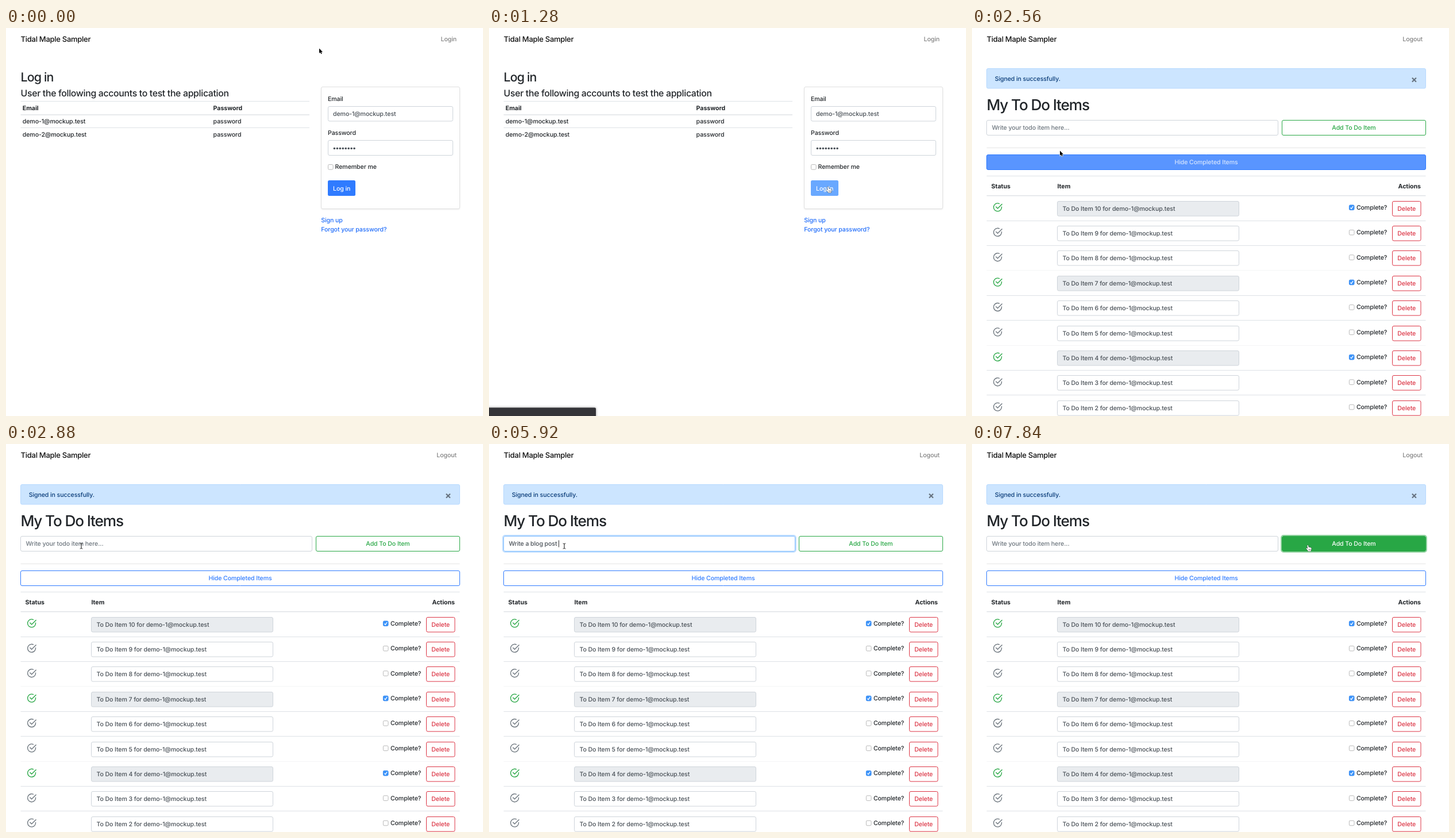
An HTML page with a canvas that plays this animation: 830 by 675 pixels, repeating every 8000 ms.

```html
<!DOCTYPE html>
<html lang="en">
<head>
<meta charset="utf-8">
<title>To do list</title>
<style>
  html, body { margin: 0; width: 100%; height: 100%; overflow: hidden; background: #fff; }
  canvas { display: block; }
</style>
</head>
<body>
<canvas id="stage" width="830" height="675"></canvas>
<script>
const ctx = document.getElementById('stage').getContext('2d');
const LOOP = 8000, TICK = 160;

const BLUE = '#2f7bff', LINK = '#1f6cfa', GREEN = '#28a745', RED = '#dc3545';
const INK = '#212529', FIELD_INK = '#495057', MUTED = '#6c757d';
const BORDER = '#ced4da', LINE = '#dee2e6';

const STYLES = {
  body:  { weight: 450, size: 10.6, track: -0.1 },
  bold:  { weight: 700, size: 10.6, track: -0.03 },
  brand: { weight: 450, size: 13, track: -0.28 },
  h1:    { weight: 550, size: 26.2, track: -1.15 },
  h2:    { weight: 550, size: 21.4, track: -0.9 },
  h4:    { weight: 550, size: 15.8, track: -0.31 },
  close: { weight: 700, size: 16.6, track: 0 }
};

const LOGIN_BTN = [560, 265, 48, 27];
const EMAIL = [560.5, 136.5, 217, 25.5];
const PASSWORD = [560.5, 195.5, 217, 26];
const TODO = [25.5, 160.5, 507, 26];
const ADD_BTN = [539.5, 160.5, 250, 26];
const HIDE_BTN = [25.5, 220.5, 764, 26];

const account = n => `demo-${n}@mockup.test`;

const NOTE = 'Write a blog post about this';
const TYPED = [
  [3520, 1], [3840, 2], [4000, 4], [4160, 5], [4320, 6], [4640, 7], [4800, 8],
  [4960, 9], [5120, 10], [5280, 11], [5600, 12], [5760, 15], [5920, 18],
  [6080, 19], [6240, 21], [6400, 23], [6560, 25], [6720, 27], [6880, 28], [7840, 0]
];

// start, end, from, to
const GLIDES = [
  [0, 640, [545, 35.5], [590, 276.5]],
  [2080, 2560, [590, 276.5], [153, 213.5]],
  [2560, 2880, [153, 213.5], [131, 177.5]],
  [7040, 7520, [131, 177.5], [584.5, 176.5]]
];

function setFont(style) {
  const s = STYLES[style];
  ctx.font = `${s.weight} ${s.size}px Inter, Roboto, sans-serif`;
  ctx.letterSpacing = s.track + 'px';
  ctx.textRendering = 'geometricPrecision';
  return s;
}

// y is the middle of the capitals
function text(str, x, y, color = INK, style = 'body', align = 'left') {
  const s = setFont(style);
  ctx.textAlign = align;
  ctx.fillStyle = color;
  ctx.fillText(str, x, y + s.size * 0.364);
}

function box([x, y, w, h], fill, stroke, r = 2.5) {
  ctx.beginPath();
  ctx.roundRect(x, y, w, h, r);
  if (fill) { ctx.fillStyle = fill; ctx.fill(); }
  if (stroke) { ctx.strokeStyle = stroke; ctx.lineWidth = 1; ctx.stroke(); }
}

function ring([x, y, w, h], color) {
  ctx.beginPath();
  ctx.roundRect(x - 1.4, y - 1.4, w + 2.8, h + 2.8, 4);
  ctx.strokeStyle = color;
  ctx.lineWidth = 2;
  ctx.stroke();
}

function rule(x0, x1, y, color = LINE, h = 1) {
  ctx.fillStyle = color;
  ctx.fillRect(x0, y, x1 - x0, h);
}

function strokeLine(points, color, width) {
  ctx.beginPath();
  points.forEach(p => ctx.lineTo(...p));
  ctx.strokeStyle = color;
  ctx.lineWidth = width;
  ctx.stroke();
}

function mix(hex, amount) {
  const channel = i => parseInt(hex.slice(i, i + 2), 16);
  return `rgb(${[1, 3, 5].map(i => Math.round(255 + (channel(i) - 255) * amount))})`;
}

// Outlined button, filled by the given amount
function button(rect, label, color, amount = 0) {
  const [x, y, w, h] = rect;
  box(rect, mix(color, amount), color);
  text(label, x + w / 2, y + h / 2, mix(color, 1 - amount), 'body', 'center');
}

function checkbox(x, y, on) {
  box([x, y, 8.6, 8.6], on ? '#3b94fb' : '#fff', on ? '#3b8cf0' : '#b9b9b9', 1.8);
  if (on) strokeLine([[x + 2, y + 4.5], [x + 3.7, y + 6.4], [x + 6.7, y + 2]], '#fff', 1.3);
}

function statusIcon(x, y, color) {
  ctx.save();
  ctx.lineCap = ctx.lineJoin = 'round';
  ctx.beginPath();
  ctx.arc(x, y, 7, -0.09, -1.15);
  ctx.strokeStyle = color;
  ctx.lineWidth = 1.35;
  ctx.stroke();
  strokeLine([[x + 7.6, y - 5.5], [x, y + 2], [x - 2.8, y - 0.8]], color, 1.35);
  ctx.restore();
}

function header(link) {
  text('Tidal Maple Sampler', 25.6, 18.8, '#111', 'brand');
  text(link, 784, 18.8, '#808080', 'body', 'right');
}

function loginPage(t) {
  header('Login');
  text('Log in', 25.6, 85, INK, 'h2');
  text('User the following accounts to test the application', 25.6, 113, INK, 'h4');

  rule(25.5, 528, 127);
  rule(25.5, 528, 150.3, LINE, 1.4);
  rule(25.5, 528, 173);
  text('Email', 28.8, 139.5, INK, 'bold');
  text('Password', 360.6, 139.5, INK, 'bold');
  [1, 2].forEach((n, i) => {
    text(account(n), 28.8, 162.5 + i * 23, INK);
    text('password', 360.6, 162.5 + i * 23, INK);
  });

  ctx.save();
  ctx.shadowColor = 'rgba(0,0,0,.08)';
  ctx.shadowBlur = 3;
  ctx.shadowOffsetY = 1.4;
  box([548.5, 102.5, 241, 212], '#fff');
  ctx.restore();
  box([548.5, 102.5, 241, 212], '#fff', '#dfdfdf');

  text('Email', 560, 123);
  box(EMAIL, '#fff', BORDER);
  text(account(1), 569, 149.5, FIELD_INK);
  text('Password', 560, 182);
  box(PASSWORD, '#fff', BORDER);
  ctx.fillStyle = FIELD_INK;
  for (let i = 0; i < 8; i++) {
    ctx.beginPath();
    ctx.arc(571.4 + i * 4.95, 209.5, 1.8, 0, 7);
    ctx.fill();
  }
  checkbox(560.5, 237.6, false);
  text('Remember me', 572.6, 241);

  const fill = t < 640 ? BLUE : t < 960 ? '#1a69dc' : t < 1120 ? '#1862cc' : '#69a8ff';
  if (t >= 960 && t < 1120) ring(LOGIN_BTN, 'rgba(0,123,255,.45)');
  box(LOGIN_BTN, fill);
  text('Log in', 584.2, 278.8, '#fff', 'body', 'center');

  text('Sign up', 548.3, 334, LINK);
  text('Forgot your password?', 548.3, 350.5, LINK);
}

function todoField(t) {
  const focus = t >= 3040 && t < 7680;
  if (focus) ring(TODO, 'rgba(0,123,255,.25)');
  box(TODO, '#fff', focus ? '#80bdff' : BORDER);

  const last = TYPED.filter(([at]) => t >= at).pop();
  const str = NOTE.slice(0, last ? last[1] : 0);
  text(str || 'Write your todo item here...', 34.4, 173.6, str ? FIELD_INK : MUTED);
  if (focus && !(t >= 3360 && t < 3520)) {
    setFont('body');
    ctx.fillStyle = '#333';
    ctx.fillRect(Math.round(34.4 + ctx.measureText(str).width), 167.5, 1, 12);
  }
}

function todoRow(i) {
  const y = 313.7 + i * 43.4, done = i % 3 === 0;
  statusIcon(44.6, y - 1.8, done ? GREEN : MUTED);
  box([148.5, Math.round(y - 13.2) + 0.5, 316, 25.6], done ? '#e9ecef' : '#fff', BORDER);
  text(`To Do Item ${10 - i} for ${account(1)}`, 157.4, y, FIELD_INK);
  checkbox(656.4, y - 5.7, done);
  text('Complete?', 668.9, y - 1.7);
  button([731.5, Math.round(y - 13.2) + 0.5, 49.5, 25.6], 'Delete', RED);
  rule(25.5, 789.5, Math.floor(y + 21.4), i % 3 === 2 ? '#f4f5f6' : LINE);
}

function listPage(t) {
  const loaded = t >= 2240;
  header('Logout');
  box([25.5, 70.5, 764, 34.5], '#cce5ff', '#b8daff');
  text('Signed in successfully.', 39.7, 88.3, '#0a3c78');
  text('×', 769.5, 89.3, '#66727f', 'close', 'center');
  text('My To Do Items', 25.4, 133.7, INK, 'h1');

  todoField(t);
  if (t >= 7680) ring(ADD_BTN, 'rgba(40,167,69,.5)');
  button(ADD_BTN, 'Add To Do Item', GREEN, t >= 7520 ? 1 : 0);

  rule(25.5, 789.5, 208, '#e5e5e5');
  const fade = t < 2400 || t >= 2880 ? 0 : t < 2560 ? 1 : t < 2720 ? 0.8 : 0.1;
  button(HIDE_BTN, 'Hide Completed Items', BLUE, fade);

  rule(25.5, 789.5, 257);
  rule(25.5, 789.5, 291, LINE, 1.4);
  text('Status', 33.6, 275, INK, 'bold');
  text('Item', loaded ? 148.5 : 297, 275, INK, 'bold');
  text('Actions', 781, 275, INK, 'bold', 'right');
  if (loaded) for (let i = 0; i < 9; i++) todoRow(i);
}

function statusBar() {
  ctx.save();
  ctx.shadowColor = 'rgba(0,0,0,.4)';
  ctx.shadowBlur = 4;
  box([-4, 660.5, 190, 20], '#343438', null, 2);
  ctx.restore();
}

const inside = ([px, py], [x, y, w, h]) => px >= x && px <= x + w && py >= y && py <= y + h;

function pointerAt(t) {
  const [start, end, from, to] = GLIDES.filter(g => t >= g[0]).pop();
  const p = Math.min(1, (t - start) / (end - start));
  const e = p * p * (3 - 2 * p);
  return from.map((v, i) => v + (to[i] - v) * e);
}

function pointerKind(pos, t) {
  const login = t < 2240;
  const buttons = login ? [LOGIN_BTN] : [ADD_BTN, HIDE_BTN];
  const fields = login ? [EMAIL, PASSWORD] : [TODO];
  if (buttons.some(r => inside(pos, r))) return 'hand';
  return fields.some(r => inside(pos, r)) ? 'beam' : 'arrow';
}

const ARROW = new Path2D('M0 0V8.6L2 6.8L3.3 9.8L4.7 9.2L3.5 6.3H6Z');
const HAND = new Path2D('M-1.2 .4C-1.2-.7 .5-.7 .7 .4L1.2 3.2C2 2.7 2.8 2.9 3 3.5' +
  'C3.8 3.1 4.5 3.4 4.7 4C5.6 3.7 6.2 4.3 6.1 5.3C6 7.2 5.4 8 5.1 10H.3' +
  'C-.3 8.3-1.6 7.4-2.8 5.8C-3.3 4.9-2.2 4.2-1.4 4.9L-.4 5.7Z');

function pointer(t) {
  const pos = pointerAt(t), kind = pointerKind(pos, t);
  ctx.save();
  ctx.translate(...pos);
  ctx.lineJoin = 'round';
  if (kind === 'beam') {
    strokeLine([[0, -4], [0, 4.2]], '#222', 1.1);
    strokeLine([[-2.4, -4.6], [0, -3.8], [2.4, -4.6]], '#222', 0.9);
    strokeLine([[-2.4, 4.8], [0, 4], [2.4, 4.8]], '#222', 0.9);
  } else {
    const hand = kind === 'hand';
    ctx.strokeStyle = hand ? '#222' : '#fff';
    ctx.fillStyle = hand ? '#fff' : '#000';
    ctx.lineWidth = hand ? 0.9 : 1.4;
    const shape = hand ? HAND : ARROW;
    ctx.stroke(shape);
    ctx.fill(shape);
    if (hand) [1.4, 2.9, 4.3].forEach(x => strokeLine([[x, 6], [x, 8.4]], '#444', 0.6));
  }
  ctx.restore();
}

function draw(now) {
  const t = Math.floor((now % LOOP) / TICK) * TICK;
  ctx.fillStyle = '#fff';
  ctx.fillRect(0, 0, 830, 675);
  if (t < 2080) loginPage(t);
  else listPage(t);
  if (t >= 1280 && t < 2240) statusBar();
  pointer(t);
}

const begin = performance.now();
function loop() {
  draw(performance.now() - begin);
  requestAnimationFrame(loop);
}
loop();
</script>
</body>
</html>
```
